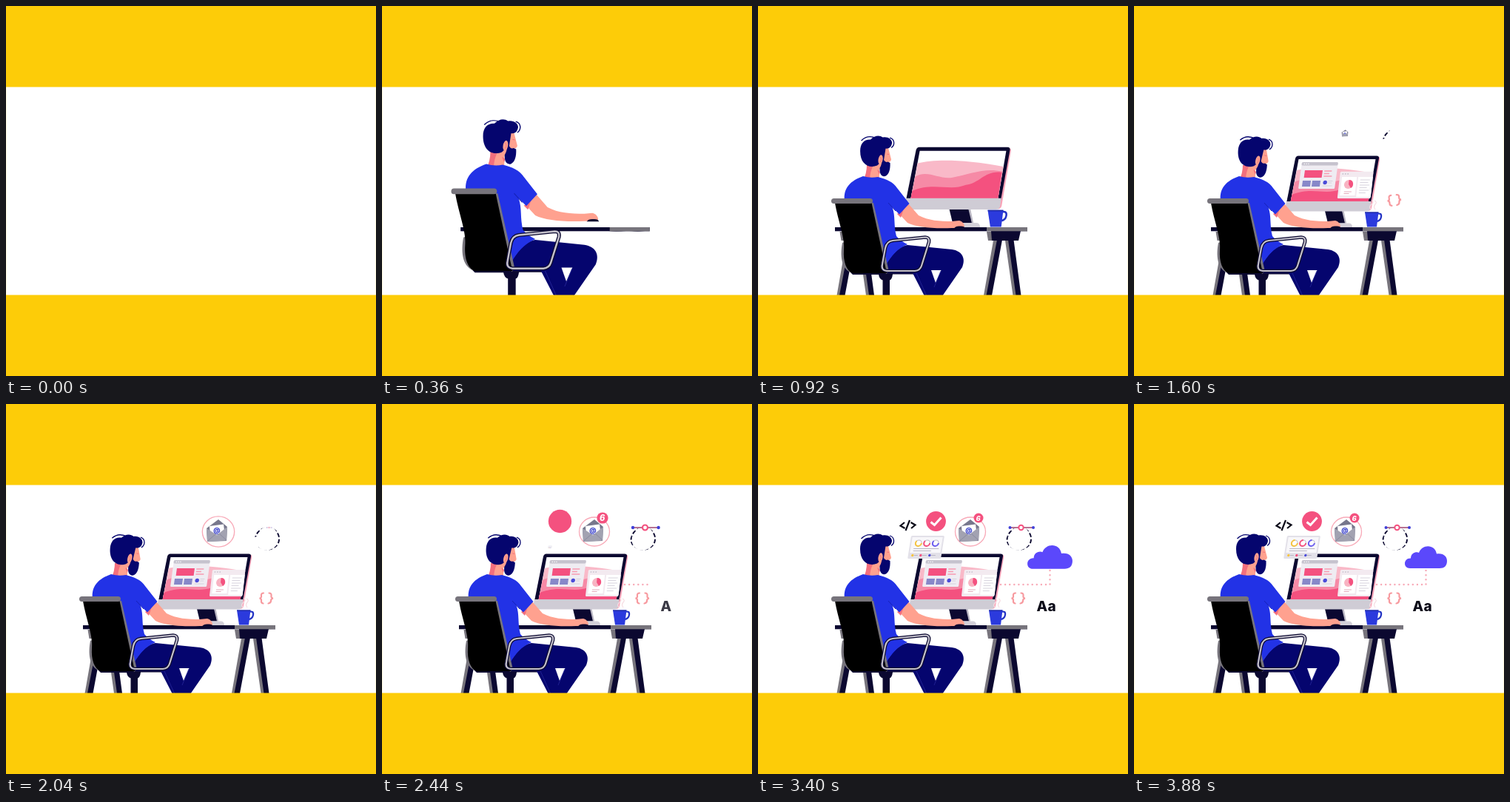
These frames come from a looping animation (500 by 500 pixels, 5040 ms). An HTML page:

```html
<!DOCTYPE html>
<html lang="en">
<head>
<meta charset="utf-8">
<title>Designer at work</title>
<style>
  html, body { margin: 0; width: 100%; height: 100%; overflow: hidden; background: #fdcc08; }
  svg { display: block; width: 100vw; height: 100vh; }
  text { font-family: Inter, "Open Sans", sans-serif; font-weight: 800; }

  .a { animation: 5.04s linear infinite both; }
  .draw { fill: none; stroke: #fff; stroke-dasharray: 1 2; }

  .top { animation-name: top; transform-origin: 234px 302px; }
  .legs { animation-name: legs; transform-origin: 234px 304px; }
  .man { animation-name: man; transform-origin: 152px 390px; }
  .head { animation-name: head; transform-origin: 152px 230px; }
  .monitor { animation-name: monitor; transform-origin: 270px 298px; }
  .mug { animation-name: mug; transform-origin: 323px 298px; }
  .steam { animation-name: steam; }
  .win1 { animation-name: win1; transform-origin: 249px 230px; }
  .win2 { animation-name: win2; transform-origin: 302px 243px; }
  .brace { animation-name: brace; transform-origin: 351px 262px; }
  .mail { animation-name: mail; transform-origin: 285px 172px; }
  .halo { animation-name: halo; transform-origin: 287px 172px; }
  .badge { animation-name: badge; transform-origin: 298px 154px; }
  .arc { animation-name: arc; }
  .node { animation-name: node; transform-origin: 355.5px 167px; }
  .disc { animation-name: disc; transform-origin: 240.5px 158.5px; }
  .tick { animation-name: tick; }
  .dots { animation-name: dots; }
  .capital { animation-name: capital; }
  .small { animation-name: small; }
  .panel { animation-name: panel; transform-origin: 227px 193px; }
  .rings { animation-name: rings; }
  .code { animation-name: code; transform-origin: 202px 164px; }
  .cloud { animation-name: cloud; transform-origin: 394px 211px; }

  @keyframes top { 0%, .5% { scale: 0 1; animation-timing-function: ease-out } 7.9%, 100% { scale: 1 } }
  @keyframes legs { 0%, 7.1% { scale: 1 0 } 11.9% { scale: 1 .55; animation-timing-function: ease-out } 15.9%, 100% { scale: 1 } }
  @keyframes man {
    0%, 1% { scale: 0; animation-timing-function: cubic-bezier(.3, 0, .4, 1) }
    9.6% { scale: 1.21 } 11.9% { scale: 1.125; animation-timing-function: ease-out }
    15.1% { scale: .98 } 17.5%, 100% { scale: 1 }
  }
  @keyframes head {
    0%, 17% { rotate: 0deg; animation-timing-function: ease-in-out }
    26%, 50% { rotate: 4.5deg; animation-timing-function: ease-in-out }
    57.5%, 100% { rotate: 0deg }
  }
  @keyframes monitor {
    0%, 9.5% { scale: 0 } 11.9% { scale: .368; translate: 0; animation-timing-function: ease-out }
    16.3% { scale: 1.16; animation-timing-function: ease-in-out }
    18.25% { scale: 1.125; translate: 2px; animation-timing-function: ease-out } 21.4%, 100% { scale: 1; translate: 0 }
  }
  @keyframes mug { 0%, 14.3% { scale: 0 } 18.25% { scale: 1.14 } 21.4%, 100% { scale: 1 } }
  @keyframes steam { 0%, 23% { opacity: 0 } 29%, 100% { opacity: 1 } }
  @keyframes win1 { 0%, 20.6% { scale: 0 } 25.4% { scale: 1.1 } 29.4%, 100% { scale: 1 } }
  @keyframes win2 { 0%, 23.8% { scale: 0 } 28.6% { scale: 1.1 } 32%, 100% { scale: 1 } }
  @keyframes brace { 0%, 27% { scale: 0; rotate: -20deg } 31% { scale: 1; rotate: -8deg } 35%, 100% { scale: 1; rotate: 0deg } }
  @keyframes mail { 0%, 30.5% { scale: 0 } 31.75% { scale: .3 } 36% { scale: 1.15 } 39.5%, 100% { scale: 1 } }
  @keyframes halo { 0%, 34.5% { scale: 0 } 39.5% { scale: 1.08 } 43%, 100% { scale: 1 } }
  @keyframes badge { 0%, 44% { scale: 0 } 47.8% { scale: 1.2 } 52%, 100% { scale: 1 } }
  @keyframes arc { 0%, 30.2% { stroke-dashoffset: 1 } 31.75% { stroke-dashoffset: .85 } 42%, 100% { stroke-dashoffset: 0 } }
  @keyframes node { 0%, 39.7% { scale: 0 } 44% { scale: 1.15 } 48.4% { scale: 1.1 } 52%, 100% { scale: 1 } }
  @keyframes disc { 0%, 44.4% { scale: 0 } 48.4% { scale: 1.17 } 52.4%, 100% { scale: 1 } }
  @keyframes tick { 0%, 50.8% { stroke-dashoffset: 1.3 } 55.6%, 100% { stroke-dashoffset: 0 } }
  @keyframes dots { 0%, 43.1% { stroke-dashoffset: 1 } 58.6%, 100% { stroke-dashoffset: 0 } }
  @keyframes capital { 0%, 45.5% { opacity: 0 } 48.4% { opacity: .8 } 50%, 100% { opacity: 1 } }
  @keyframes small { 0%, 50% { opacity: 0 } 54%, 100% { opacity: 1 } }
  @keyframes panel { 0%, 47.8% { scale: 0 } 48.4% { scale: .1 } 53% { scale: 1.12 } 56.5%, 100% { scale: 1 } }
  @keyframes rings { 0%, 59.5% { stroke-dashoffset: 1 } 69%, 100% { stroke-dashoffset: .25 } }
  @keyframes code { 0%, 55.6% { scale: 0 } 58.7% { scale: .86 } 61% { scale: 1.15 } 64.5%, 100% { scale: 1 } }
  @keyframes cloud { 0%, 60.5% { scale: 0 } 65.5% { scale: 1.12 } 70%, 100% { scale: 1 } }
</style>
</head>
<body>
<svg viewBox="0 0 500 500" preserveAspectRatio="none">
  <defs>
    <g id="trestle">
      <path fill="#77747c" d="M309 305H322L318 317H311ZM318 317H326L313 391H305ZM334 317H341L350 391H344.500Z"/>
      <path fill="#0b0830" d="M315 304H355L352 317H316ZM323 316H330L316 391H308.500ZM338 316H345.500L355.500 391H348.500Z"/>
    </g>
    <path id="armrest" d="M174 358Q166 357 168 349L172 327Q174 318 182 317L226 312.500Q232 312.500 231 319L221 351Q219 357.500 212 358Z"/>
    <mask id="arcMask" maskUnits="userSpaceOnUse" x="330" y="160" width="50" height="50">
      <path class="a draw arc" pathLength="1" stroke-width="7" d="M341.500 172.500A16.500 15.500 -30 1 1 341.400 172.700"/>
    </mask>
    <mask id="dotMask" maskUnits="userSpaceOnUse" x="320" y="195" width="85" height="60">
      <path class="a draw dots" pathLength="1" stroke-width="8" d="M326 244H394.500V205"/>
    </mask>
  </defs>

  <rect width="500" height="500" fill="#fff"/>
  <path fill="#fffae0" d="M0 109H1V391H0ZM499 109H500V391H499Z"/>

  <!-- desk -->
  <g class="a legs"><use href="#trestle"/><use href="#trestle" x="-198.500"/></g>
  <g class="a top">
    <rect x="104" y="299" width="260" height="5.300" fill="#0b0830"/>
    <rect x="309" y="299" width="55" height="5.300" fill="#77747c"/>
  </g>

  <!-- monitor -->
  <g class="a monitor">
    <path fill="#0b0830" d="M258 277H282L285.500 293.500H262Z"/>
    <path fill="#b9b6c2" d="M281 277H283.500L287 293.500H285Z"/>
    <path fill="#d3d0d9" d="M264 293.500H291Q295 294 295 299H262Z"/>
    <path fill="#f9a2b7" d="M329 204Q333 203 332 208L321 273Q320 277 316 277Z"/>
    <path fill="#0b0830" d="M222 202.500H328Q331.500 202.500 331 206L320 266H206L218 206Q219 202.500 222 202.500Z"/>
    <path fill="#fff" d="M222.500 207H326.500L316.500 265H211.500Z"/>
    <path fill="#f9b9c8" d="M220 222C240 217 275 217 323 226L316.500 265H211.500Z"/>
    <path fill="#f68aa6" d="M217 238C232 229 246 242 262 239C284 235 300 227 322 232L316.500 265H211.500Z"/>
    <path fill="#f4517f" d="M321 233C301 230 295 246 278 248C258 256 240 244 213.500 255L211.500 265H316.500Z"/>
    <path fill="#cfccd5" d="M206 264H320.500L319 274Q318 277.500 314 277.500H207Q203.500 277.500 204 274Z"/>
  </g>

  <g class="a win1"><g transform="translate(227 211) skewX(-7.9)">
    <rect width="49" height="36" rx="1.500" fill="#efecf2"/>
    <rect width="49" height="4.500" rx="1.500" fill="#c6c3ce"/>
    <path stroke="#fff" stroke-width="1.300" stroke-dasharray="1.300 1.500" d="M3 2.300H11"/>
    <rect x="5.500" y="11" width="24" height="10" fill="#f4517f"/>
    <path stroke="#f79bb1" stroke-width="1.400" d="M32 12H42M32 15.500H39M32 19H43"/>
    <path fill="#8788c9" d="M4.500 25H15.500V33H4.500ZM17.500 25H28.500V33H17.500Z"/>
    <circle cx="35" cy="27.500" r="2.700" fill="#4a4bd8"/>
    <path stroke="#d5d2dc" d="M39 25.500H45M39 28H44M32 32H45"/>
  </g></g>

  <g class="a win2"><g transform="translate(279 224) skewX(-6.500)">
    <rect width="44.500" height="36" rx="1.500" fill="#f3eaf0"/>
    <path stroke="#c6c3ce" stroke-width="1.600" stroke-dasharray="1.600 1.800" d="M3 3H13"/>
    <rect x="3" y="7" width="20" height="25" fill="#fff"/>
    <path fill="#fff" d="M25 7H44.500V34H25Z"/>
    <circle cx="13" cy="17" r="6" fill="#f8b3c2"/>
    <path fill="#f4517f" d="M13 17V11A6 6 0 0 1 16.500 21.900Z"/>
    <path stroke="#e3aebd" d="M8 27H18M8 29.500H15"/>
    <path stroke="#d8d4de" stroke-width="1.100" d="M28 11H41M28 14.500H39M28 18H41M28 21.500H38M28 25H41M28 28.500H37"/>
  </g></g>

  <!-- mug -->
  <g class="a mug">
    <path fill="none" stroke="#2333c4" stroke-width="2.200" d="M328 281Q335 279 334 285Q333 291 327 291"/>
    <path fill="#2b3add" d="M312 278.500H330.500L328 298.500H315Z"/>
    <path fill="#1d289f" d="M312 278.500H330.500L330.300 279.800H312.200Z"/>
  </g>
  <path class="a steam" fill="none" stroke="#f6dde2" stroke-width="1.200" d="M320 275Q317 271 321 268T321 262M326 275Q323 271 326 268T325 263"/>

  <!-- man and chair -->
  <g class="a man">
    <path fill="none" stroke="#0b0830" stroke-width="3.500" d="M166 316Q172 311 179 314"/>
    <path fill="#0b0830" d="M124 359H213V362.500H182Q181 370 178 370.500V392H168.500V370.500Q164 369 163 363H128Z"/>
    <path fill="#05056e" d="M168 358C176 342 188 325 202 323L262 329C276 331 281 341 276 353L249 392H225L209 361H168Z"/>
    <path fill="#fff" d="M234 357H247.500L240 374Z"/>
    <path fill="none" stroke="#2a2aa0" stroke-width=".7" d="M214 361L228 392M247 358L238 380"/>
    <path fill="#ffa18f" d="M152 212H164V234H148Z"/>
    <path fill="#f36f7d" d="M147 215H156Q151 224 151 236H142Q147 226 147 215ZM161 221L165 224L164 228Z"/>
    <path fill="#ffa18f" d="M190 280L203 267L217 283C230 290 246 291 262 291L272 290C276 291 279 294 279 298L276 300H262C236 301 214 299 202 293Z"/>
    <path fill="#f36f7d" d="M188 281L197 274L193 286Z"/>
    <path fill="#0b0830" d="M265 300.500Q267 297 273 297.500Q279 297 280 300.500Z"/>
    <path fill="#2232e6" d="M117 263C115 246 125 236 142 230Q152 233 162 231C174 234 183 238 188 246L204.500 267L191 281.500L181.500 272C186 284 183 296 187 311Q193 318 202 322C188 328 180 338 173 350H150Z"/>
    <path fill="none" stroke="#1622b8" stroke-width="1" d="M176 266L186 277"/>

    <g class="a head">
      <path fill="#ffa18f" d="M159 192H176L180 207.500Q179.500 210.500 176.500 211L175 220H160Z"/>
      <path fill="#05056e" d="M169 192H172.500L170 208Q172 212 175.500 210.500L178.500 212C179 221 177 228 172 230C167 231 164 227 164.500 219Q168 213 167 207Z"/>
      <path fill="#05056e" d="M138 196C138 186 143 180 152 180.500C157 175 164 174 168.500 177.500C175 176 181 180 181 185C180 191 177 193 172 192.500L168 207L165 212L161 215.500C150 220 138 214 138 196Z"/>
      <ellipse cx="165.500" cy="207.500" rx="3" ry="6.300" fill="#ffa18f" transform="rotate(10 165.500 207.500)"/>
      <path fill="none" stroke="#f36f7d" stroke-width=".9" d="M165 204Q168 207 165 211M174 200L177 200.500"/>
      <path fill="none" stroke="#05056e" stroke-width="1.300" d="M139.500 182C146 175.500 154 176 160 179M178 178C185 180 185 188 180 191.500"/>
    </g>

    <path fill="#77747c" d="M114 320C111 336 112 354 125 360H133L119 318ZM152 266H156L177 359L173 362Z"/>
    <path fill="#000" d="M104 266H153.500L174 361H128C119 358 115 345 116 330C118 314 108 290 104 266Z"/>
    <rect x="99" y="260" width="56" height="7" rx="3.500" fill="#77747c"/>
    <g fill="none">
      <use href="#armrest" stroke="#0b0830" stroke-width="4.600"/>
      <use href="#armrest" stroke="#c4c1cb" stroke-width="2.200"/>
    </g>
  </g>

  <!-- floating icons -->
  <g class="a brace" fill="none" stroke="#f79a9f" stroke-width="2.200" stroke-linecap="round">
    <path d="M348 255.500Q344.500 255.500 345 259T342.500 262.500Q345.500 263 345 266T347.500 269.500"/>
    <path d="M355.500 255.500Q359 255.500 358.500 259T361 262.500Q358 263 358 266T354.500 269.500"/>
  </g>

  <ellipse class="a halo" cx="287" cy="172.500" rx="20.500" ry="19.500" fill="none" stroke="#f8aab8" stroke-width="1.300"/>
  <g class="a mail">
    <path fill="#77778c" d="M271 168L287 156L299 166L298 185L272 186Z"/>
    <path fill="#fff" d="M275 165L294 162.500L296 178L276 179Z"/>
    <text x="285" y="174" font-size="9" text-anchor="middle" fill="#3038c8">@</text>
    <path fill="#a2a2b1" d="M271 168L285 177L299 166L298 184.500L272 186Z"/>
    <path fill="none" stroke="#85859a" stroke-width=".8" d="M272 185.500L283 176M298 184L288 175"/>
  </g>
  <g class="a badge">
    <circle cx="298" cy="154" r="6.500" fill="#f4517f"/>
    <text x="297.700" y="157.500" font-size="9.500" font-style="italic" text-anchor="middle" fill="#fff">6</text>
  </g>

  <ellipse cx="352.800" cy="183" rx="16.500" ry="15.500" transform="rotate(-30 352.800 183)" fill="none" stroke="#0b0830" stroke-width="1.900" stroke-dasharray="5.500 2.800" mask="url(#arcMask)"/>
  <g class="a node">
    <path stroke="#a0456f" stroke-width="1.300" d="M340 167H373"/>
    <circle cx="340.500" cy="167" r="2" fill="#4040d8"/>
    <circle cx="372" cy="167" r="2" fill="#4040d8"/>
    <circle cx="355.500" cy="167" r="3.200" fill="#fff" stroke="#f4517f" stroke-width="2"/>
  </g>

  <g class="a disc">
    <circle cx="240.500" cy="158.500" r="13.400" fill="#f4517f"/>
    <path class="a draw tick" pathLength="1" stroke-width="3" d="M233.500 159.500L238.500 163.500L247.500 153.500"/>
  </g>

  <path fill="none" stroke="#f8abb8" stroke-width="2.500" stroke-linecap="round" stroke-dasharray="0 6.100" d="M328 244H394.500V206" mask="url(#dotMask)"/>

  <g font-size="19" fill="#0b0a18">
    <text class="a capital" x="376.500" y="280.300">A</text>
    <text class="a small" x="391.500" y="280.300">a</text>
  </g>

  <g class="a panel"><g transform="translate(207 178) skewX(-9)">
    <rect width="45" height="31" rx="1.500" fill="#e3e1e9"/>
    <rect x="2" y="2" width="41" height="21" fill="#f8f7fa"/>
    <g fill="#fff" stroke="#c3c0cc" stroke-width="1.200">
      <circle cx="11.500" cy="10" r="4"/><circle cx="22.800" cy="10" r="4"/><circle cx="34.500" cy="10" r="4"/>
    </g>
    <g fill="none" stroke-width="2" stroke-dasharray="1 1">
      <circle class="a rings" pathLength="1" cx="11.500" cy="10" r="4" stroke="#f6c440"/>
      <circle class="a rings" pathLength="1" cx="22.800" cy="10" r="4" stroke="#f4517f"/>
      <circle class="a rings" pathLength="1" cx="34.500" cy="10" r="4" stroke="#6a5cf0"/>
    </g>
    <path stroke="#b9b6c3" d="M6 17.500H40M6 20.500H30"/>
    <path stroke="#b9b6c3" stroke-width="1.200" d="M8 26.500H13M19 26.500H25M31 26.500H37"/>
    <circle cx="6" cy="26.500" r="1.700" fill="#f6c440"/>
    <circle cx="17" cy="26.500" r="1.700" fill="#f4517f"/>
    <circle cx="29" cy="26.500" r="1.700" fill="#4a4bd8"/>
  </g></g>

  <path class="a code" fill="none" stroke="#0b0a18" stroke-width="2.200" d="M198 160L192.500 164.500L198.500 168M205 157L199.500 171M206.500 160L212.500 163.500L207 168"/>

  <path class="a cloud" fill="#5b48fb" d="M373 222C363 222 364 208 374 208.500C374 201 382 199 385 201C389 189 407 189 409 202.500C418 201 423 206 423 212C423 219 419 222 413 222Z"/>

  <path fill="#fdcc08" d="M0 0H500V109.400H0ZM0 390.500H500V500H0Z"/>
</svg>
</body>
</html>
```
